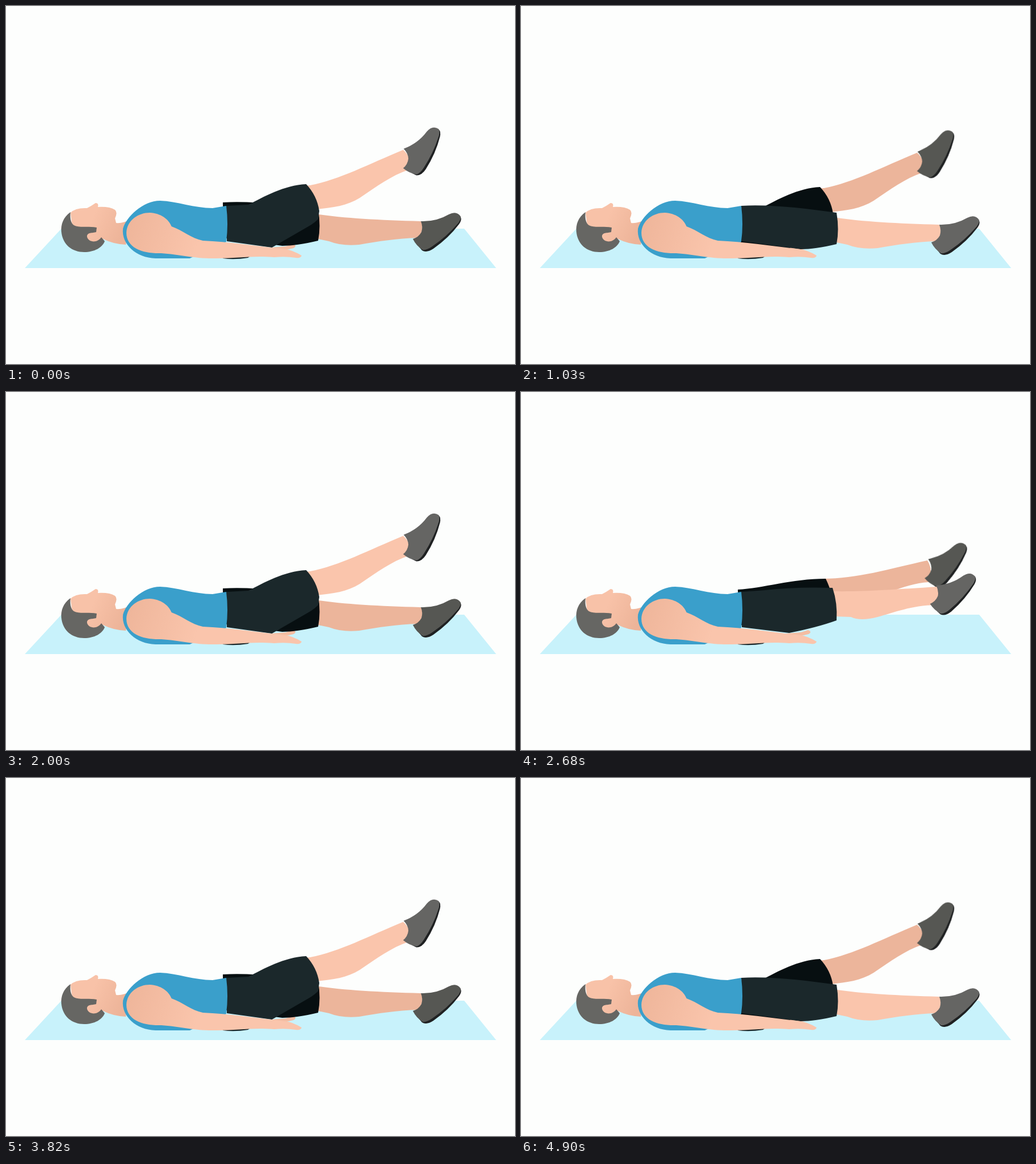
Animation, 892 px wide and 627 px high, one loop 4950 ms. Source, as an HTML page without scripts:

```html
<!DOCTYPE html>
<html lang="en">
<head>
<meta charset="utf-8">
<title>Flutter kicks</title>
<style>
  html, body { margin: 0; width: 100%; height: 100%; overflow: hidden; background: #fdfefd; }
  svg { display: block; width: 892px; height: 627px; }
  .near { --skin: #fac5ac; --shorts: #1b282b; --shoe: #656563; }
  .far { --skin: #ecb59b; --shorts: #070f11; --shoe: #565753; }
  .skin { fill: var(--skin); }
  .shorts { fill: var(--shorts); }
  .upper { fill: var(--shoe); }
  .sole { fill: #1f2122; }

  /* Four held poses, 460 ms each, cycling through the loop */
  .pose { opacity: 0; animation: 4950ms step-end infinite; }
  .high { animation-name: high; }
  .falling { animation-name: falling; }
  .low { animation-name: low; }
  .rising { animation-name: rising; }
  @keyframes high {
    0%, 37.172%, 74.343% { opacity: 1; }
    9.293%, 46.465%, 83.636%, 100% { opacity: 0; }
  }
  @keyframes falling {
    9.293%, 46.465%, 83.636% { opacity: 1; }
    0%, 18.586%, 55.758%, 92.929%, 100% { opacity: 0; }
  }
  @keyframes low {
    18.586%, 55.758%, 92.929% { opacity: 1; }
    0%, 27.879%, 65.051% { opacity: 0; }
    100% { opacity: 1; }
  }
  @keyframes rising {
    27.879%, 65.051% { opacity: 1; }
    0%, 37.172%, 74.343%, 100% { opacity: 0; }
  }
</style>
</head>
<body>
<svg viewBox="0 0 892 627">
  <defs>
    <linearGradient id="armTone" gradientUnits="userSpaceOnUse" x1="215" y1="385" x2="335" y2="425">
      <stop offset="0" stop-color="#efb69b"/>
      <stop offset="1" stop-color="#fac5ac"/>
    </linearGradient>
    <linearGradient id="faceTone" gradientUnits="userSpaceOnUse" x1="150" y1="375" x2="205" y2="400">
      <stop offset="0" stop-color="#f8c2a8"/>
      <stop offset="1" stop-color="#edb499"/>
    </linearGradient>

    <!-- The heel's lowest point is the origin -->
    <g id="shoe">
      <path class="sole" d="M65-60 Q67-55 62-48 Q44-24 17-5 Q5 3-3-2 L-8-8 L50-58Z"/>
      <path class="upper" d="M-5-53 Q22-52 44-65 Q58-72 65-61 Q65-54 58-47 Q40-26 15-9 Q5-2-2-3 Q-13-10-19-22 Q-9-25-4-34 Q-1-43-5-53Z"/>
    </g>

    <g id="legHigh">
      <path class="skin" d="M520 315 L533 314 C585 304 635 277 696 252 Q712 265 705 287 C675 297 650 316 620 336 C598 350 572 353 545 356Z"/>
      <path class="shorts" d="M386 350 L425 348 C452 334 487 314 526 312 Q545 332 549 359 L547 373 Q542 379 530 386 L466 423 L387 412Z"/>
      <use href="#shoe" transform="translate(722 297) rotate(-22.8)"/>
    </g>
    <g id="legRising">
      <path class="skin" d="M535 331 C595 331 650 314 718 299 Q729 315 720 337 C675 340 635 365 595 372 Q575 377 540 376Z"/>
      <path class="shorts" d="M386 350 C430 348 480 331 540 331 Q553 358 553 379 L549 396 Q510 408 470 419 L387 412Z"/>
      <use href="#shoe" transform="translate(737 347) rotate(-13.6)"/>
    </g>
    <g id="legFalling">
      <path class="skin" d="M545 349 C600 350 650 346 730 341 Q738 359 727 373 C683 374 655 386 625 394 Q595 402 578 394 L548 393Z"/>
      <path class="shorts" d="M386 350 L428 347 Q480 341 546 343 Q555 370 553 400 Q520 412 470 422 L387 412Z"/>
      <use href="#shoe" transform="translate(738 391) rotate(-6)"/>
    </g>
    <g id="legLow">
      <path class="skin" d="M548 370 C600 378 660 381 733 383 Q740 398 728 412 C690 413 660 418 625 424 Q595 427 572 418 L548 413Z"/>
      <path class="shorts" d="M386 350 C440 347 500 355 553 362 Q558 392 553 417 Q515 426 490 426 L387 412Z"/>
      <use href="#shoe" transform="translate(738 436)"/>
    </g>
  </defs>

  <path fill="#c8f2fb" d="M33 459 L97 390 H803 L859 459Z"/>

  <path fill="#f4bda2" d="M450 424 L490 421 L503 417 Q511 420 504 424 L470 432Z"/>

  <g class="pose high">
    <use class="far" href="#legLow" x="-6" y="-6"/>
    <use class="near" href="#legHigh"/>
  </g>
  <g class="pose falling">
    <use class="far" href="#legRising" x="-6" y="-4"/>
    <use class="near" href="#legFalling"/>
  </g>
  <g class="pose low">
    <use class="far" href="#legHigh" x="-2" y="5"/>
    <use class="near" href="#legLow"/>
  </g>
  <g class="pose rising">
    <use class="far" href="#legFalling" x="-6" y="-4"/>
    <use class="near" href="#legRising"/>
  </g>

  <!-- Head and neck -->
  <path fill="url(#faceTone)" d="M113 362 Q122 353 142 354 Q150 350 157 345 Q163 345 161 352 Q182 351 191 357 Q196 361 191 372 L193 380 Q205 381 218 374 L210 418 Q188 417 170 408 L150 420 L118 400Z"/>
  <path fill="#666663" d="M113 361 C100 370 96 383 97 395 C99 418 116 431 137 431 C155 431 169 423 173 412 L167 405 C160 416 144 414 142 404 C142 396 151 398 158 396 L159 388 C142 385 128 389 119 384 C113 380 112 370 113 361Z"/>

  <!-- Torso and arm -->
  <path fill="#3a9fcb" d="M205 390 C210 370 240 341 270 341 C300 342 330 354 362 354 L386 350 Q390 382 386 413 L322 442 H262 C228 441 202 417 205 390Z"/>
  <path fill="#1b282b" d="M380 430 H440 L424 441 Q400 445 380 442Z"/>
  <path fill="url(#armTone)" d="M211 397 C212 375 232 362 252 362 C271 363 285 373 290 386 C310 393 325 407 345 411 C390 413 440 420 489 426 Q501 427 518 437 Q517 442 508 441 Q490 438 470 440 C430 437 405 442 370 442 C330 443 305 435 272 433 C240 434 211 424 211 397Z"/>
</svg>
</body>
</html>
```
